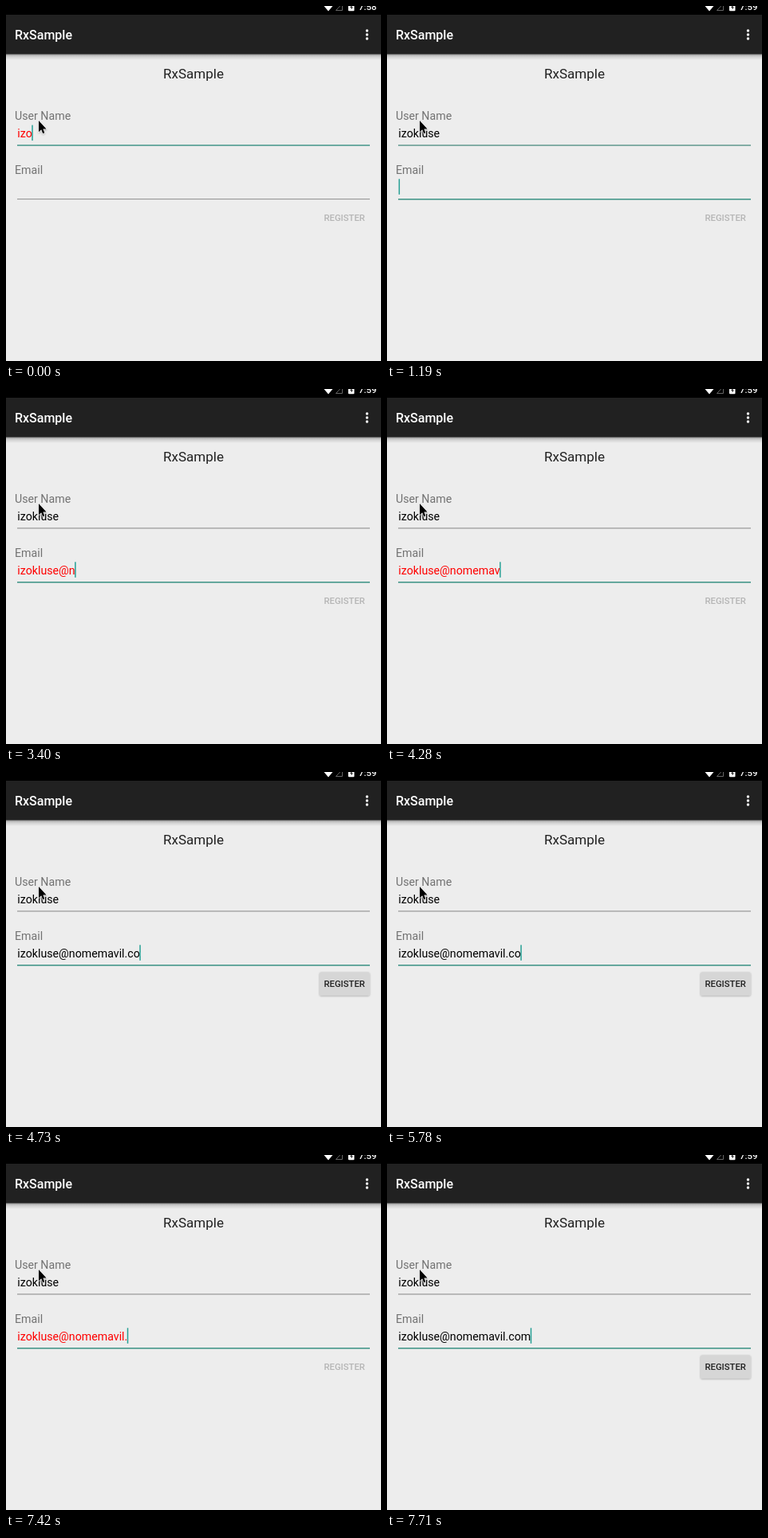
Recreate the animation shown at these times as an HTML page. Size 470 by 446 pixels, loop 8000 ms.

```html
<!DOCTYPE html>
<html lang="en">
<head>
<meta charset="utf-8">
<title>RxSample</title>
<style>
  html, body { margin: 0; width: 100%; height: 100%; overflow: hidden; background: #ededed; }
  svg { display: block; }
  text { font-family: Roboto, sans-serif; white-space: pre; }
  .medium { font-weight: 500; }
  .label { font-size: 14.2px; fill: #727272; }
  .value { font-size: 14.2px; }
</style>
</head>
<body>
<svg width="470" height="446" viewBox="0 0 470 446">
  <defs>
    <linearGradient id="shade" x2="0" y2="1">
      <stop offset="0" stop-opacity=".42"/>
      <stop offset=".4" stop-opacity=".14"/>
      <stop offset="1" stop-opacity="0"/>
    </linearGradient>
    <filter id="soft" x="-20%" y="-20%" width="140%" height="150%">
      <feDropShadow dx="0" dy="1" stdDeviation=".8" flood-opacity=".3"/>
    </filter>
  </defs>
  <rect width="470" height="446" fill="#ededed"/>
  <rect y="60" width="470" height="8" fill="url(#shade)"/>
  <rect width="470" height="60.5" fill="#212121"/>
  <rect width="470" height="11" fill="#000"/>

  <!-- status icons -->
  <path d="M398.5 0H409.5L404 6.5Z" fill="#fff"/>
  <path d="M421.5 -3V5.5H413.5Z" fill="none" stroke="#666"/>
  <rect x="429" y="-4" width="7.5" height="10.3" rx="1" fill="#fff"/>
  <path d="M433.6 -1L431 2H432.6V4.6L435 1.4H433.6Z" fill="#222"/>
  <text id="clock" class="medium" x="442" y="5.3" font-size="11.4" fill="#fff"></text>

  <text class="medium" x="11" y="41.8" font-size="16" fill="#fff">RxSample</text>
  <g fill="#fff">
    <circle cx="452.5" cy="31" r="1.7"/>
    <circle cx="452.5" cy="36" r="1.7"/>
    <circle cx="452.5" cy="41" r="1.7"/>
  </g>

  <text x="235" y="91.2" font-size="17" fill="#212121" text-anchor="middle">RxSample</text>
  <text class="label" x="11" y="143">User Name</text>
  <text class="label" x="11" y="210.6">Email</text>
  <rect id="nameLine" x="14" width="442"/>
  <rect id="mailLine" x="14" width="442"/>
  <text id="name" class="value" x="14.3" y="164.8"></text>
  <text id="mail" class="value" x="14.3" y="232.8"></text>
  <rect id="caret" width="1.5" height="19.5" fill="#26a095"/>

  <rect id="button" x="393" y="251.3" width="62.7" height="29.2" rx="1.8" fill="#d6d6d6" filter="url(#soft)"/>
  <text id="register" class="medium" x="424.2" y="270.2" font-size="11.3" text-anchor="middle">REGISTER</text>

  <path d="M41 144V158.2L44.2 155.2L46.2 160.2L48.4 159.3L46.4 154.5H50.6Z"
        fill="#000" stroke="#fff" stroke-width="1.1" paint-order="stroke" filter="url(#soft)"/>
</svg>
<script>
const LOOP = 8000;
const USER = "izokluse";
const ADDRESS = USER + "@nomemavil.com";
const FOCUS_TIME = 1190;

// Each step: [start ms, number of characters shown]
const nameSteps = [[0, 3], [150, 5], [290, 7], [440, 8]];
const mailSteps = [
  [0, 0], [2070, 1], [2220, 2], [2510, 3], [2660, 4], [2800, 6], [2950, 8], [3100, 9],
  [3400, 10], [3550, 11], [3690, 12], [3840, 13],
  [4130, 14], [4280, 16], [4430, 18], [4580, 20], [4730, 21], [4880, 22],
  [5780, 21], [5930, 20], [6080, 19], [6230, 18], [6380, 17],
  [7270, 18], [7420, 19], [7560, 21], [7710, 22]
];
const caretOff = [[890, 1190], [1630, 2070], [5330, 5780], [6820, 7270]];

const $ = id => document.getElementById(id);
const set = (node, attrs) => {
  for (const key in attrs) node.setAttribute(key, attrs[key]);
};
const countAt = (steps, t) => steps.filter(step => step[0] <= t).pop()[1];

function showField(node, text, valid) {
  node.textContent = text;
  set(node, { fill: valid ? "#000" : "#f00" });
}

function showLine(node, y, fill, height) {
  set(node, { y, fill, height });
}

function render(t) {
  const name = USER.slice(0, countAt(nameSteps, t));
  const mail = ADDRESS.slice(0, countAt(mailSteps, t));
  const mailValid = /@\w+\.\w+$/.test(mail);
  const onMail = t >= FOCUS_TIME;

  $("clock").textContent = t < 290 ? "7:58" : "7:59";
  showField($("name"), name, name.length > 4);
  showField($("mail"), mail, mailValid);

  const teal = "#45978a", gray = "#979797";
  const nameFill = !onMail ? teal : t < 1340 ? "#629a8f" : t < 1480 ? "#88988f" : gray;
  showLine($("nameLine"), 174.3, nameFill, t < 1340 ? 1.5 : 1.2);
  showLine($("mailLine"), 242, onMail ? teal : gray, onMail ? 1.6 : 1.1);

  const field = onMail ? $("mail") : $("name");
  const width = field.textContent ? field.getComputedTextLength() : 0;
  const hidden = caretOff.some(([from, to]) => t >= from && t < to);
  set($("caret"), {
    x: Math.max(14.6, 13.8 + width),
    y: onMail ? 217.3 : 149.6,
    visibility: hidden ? "hidden" : "visible"
  });

  set($("button"), { visibility: mailValid ? "visible" : "hidden" });
  set($("register"), { fill: mailValid ? "#212121" : "#b5b5b5" });
}

function tick() {
  render(performance.now() % LOOP);
  requestAnimationFrame(tick);
}
tick();
</script>
</body>
</html>
```
